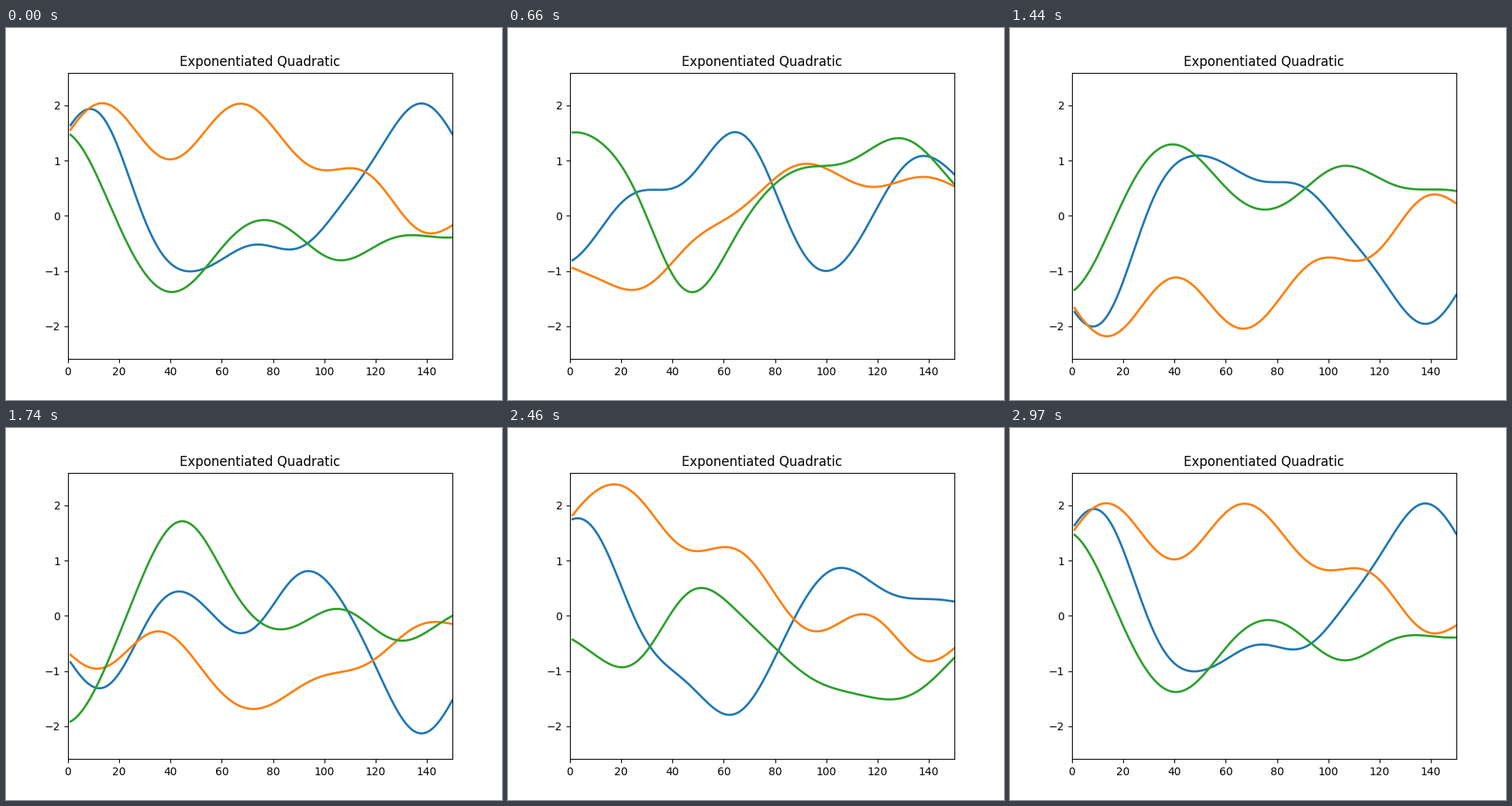
Animation of 640 by 480 pixels, one loop 3 s. Source, as a matplotlib script:

```python
import numpy as np
import matplotlib.pyplot as plt
from matplotlib.animation import FuncAnimation

FRAMES = 100
STEP = 15        # spacing of the key points
LENGTH = 16      # kernel length scale

# Key points of each curve: start pose, then the pose a quarter turn later
KEYS = [
    ([1.57, 1.69, -.08, -.99, -.79, -.52, -.58, .10, 1.08, 2.00, 1.48],
     [-1.12, -.34, .49, .81, 1.59, 1.09, -.50, -.93, -.03, .72, .50]),
    ([1.49, 2.03, 1.33, 1.11, 1.87, 1.86, 1.06, .84, .65, -.19, -.17],
     [-1.20, -1.60, -1.52, -.79, -.41, .15, .76, .60, .42, .74, .57]),
    ([1.50, .34, -1.04, -1.32, -.58, -.08, -.37, -.80, -.55, -.35, -.39],
     [1.26, 1.16, .16, -1.13, -.66, .36, .93, 1.09, 1.40, 1.38, .65]),
]


def kernel(p, q):
    """Exponentiated quadratic covariance."""
    return np.exp(-0.5 * ((p[:, None] - q) / LENGTH) ** 2)


def gp_mean(x, values):
    """Gaussian process mean through evenly spaced key points."""
    knots = STEP * np.arange(len(values))
    return kernel(x, knots) @ np.linalg.solve(kernel(knots, knots), values)


x = np.arange(1, 151)
pairs = [(gp_mean(x, a), gp_mean(x, b)) for a, b in KEYS]

fig, ax = plt.subplots(figsize=(6.4, 4.8), dpi=100)
ax.set_title("Exponentiated Quadratic")
ax.set_xlim(0, 150)
ax.set_ylim(-2.593, 2.593)
lines = [ax.plot(x, a, lw=2)[0] for a, _ in pairs]


def update(i):
    """Move every curve along its great circle."""
    angle = 2 * np.pi * i / (FRAMES - 1)
    for line, (a, b) in zip(lines, pairs):
        line.set_ydata(a * np.cos(angle) + b * np.sin(angle))
    return lines


anim = FuncAnimation(fig, update, frames=FRAMES, interval=30, repeat=True)
plt.show()
```
